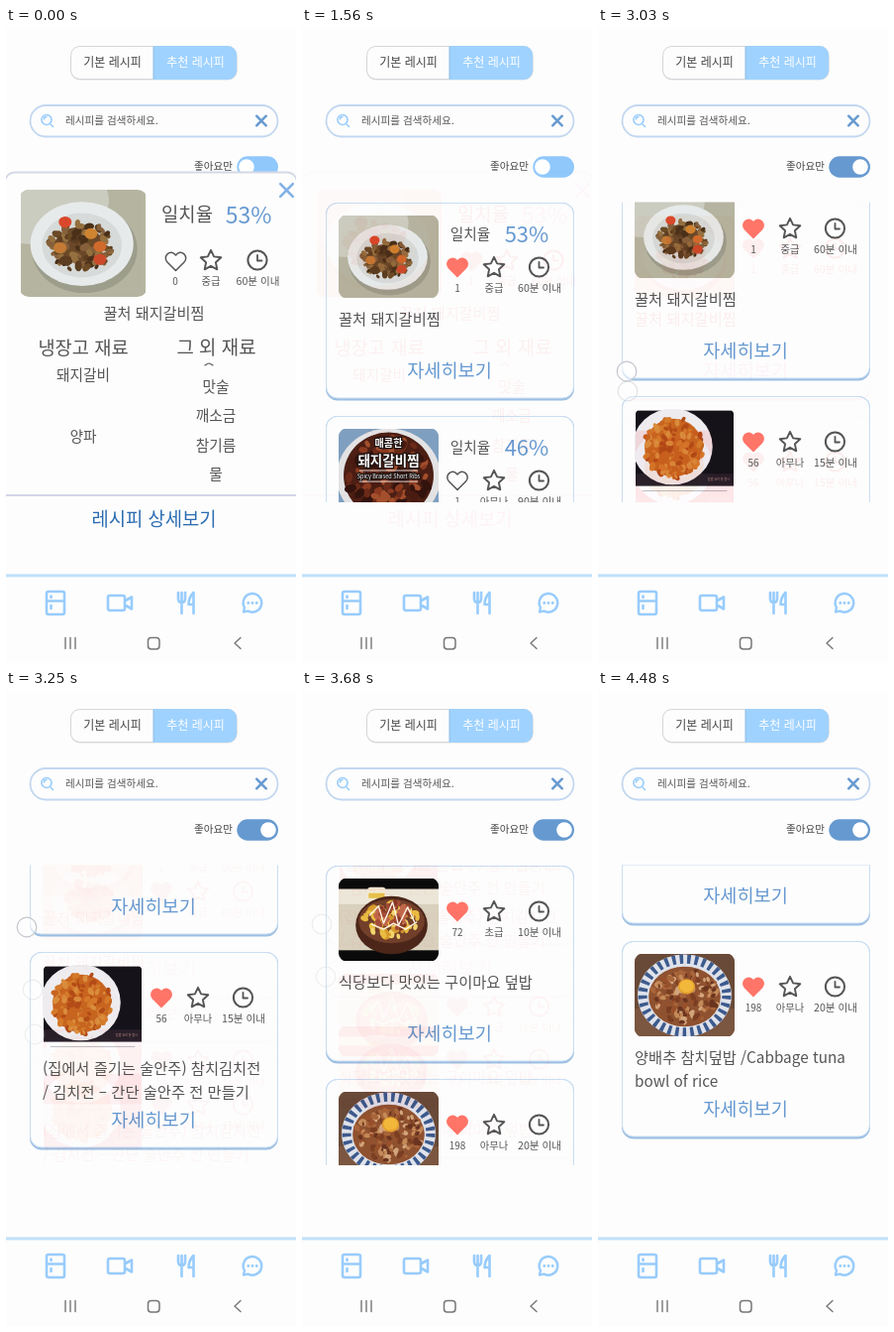
Write an HTML page that moves like this. It is 293 by 640 pixels and loops after 4550 ms.

```html
<!DOCTYPE html>
<html lang="ko">
<head>
<meta charset="utf-8">
<title>추천 레시피</title>
<style>
  html, body { margin: 0; width: 100%; height: 100%; overflow: hidden; background: #fdfdfd; }
  svg#stage { display: block; width: 100vw; height: 100vh; }
  text { font-family: "Noto Sans CJK KR", "Noto Sans CJK", "Noto Sans", sans-serif; }
  .trail { mix-blend-mode: multiply; filter: url(#pink); }
</style>
</head>
<body>
<svg id="stage" viewBox="0 0 293 640" preserveAspectRatio="none"></svg>
<script>
const LOOP = 4550;
const INK = '#555', SOFT = '#98ccfc', BLUE = '#6699d0', PAPER = '#fdfdfd', RED = '#ff7568';

// ---------- drawing helpers ----------
const text = (x, y, str, size, fill = INK, anchor = 'middle', weight = 400) =>
  `<text x="${x}" y="${y + size * .41}" font-size="${size}" fill="${fill}" text-anchor="${anchor}" font-weight="${weight}">${str}</text>`;
const rect = (x, y, w, h, r, fill, extra = '') =>
  `<rect x="${x}" y="${y}" width="${w}" height="${h}" rx="${r}" fill="${fill}" ${extra}/>`;
const ellipse = (x, y, rx, ry, fill, extra = '') =>
  `<ellipse cx="${x}" cy="${y}" rx="${rx}" ry="${ry}" fill="${fill}" ${extra}/>`;
const line = (d, color, width) =>
  `<path d="${d}" fill="none" stroke="${color}" stroke-width="${width}" stroke-linecap="round" stroke-linejoin="round"/>`;
const cross = (x, y, r, color, w) => line(`M${x - r} ${y - r}l${2 * r} ${2 * r}m0 ${-2 * r}l${-2 * r} ${2 * r}`, color, w);

const heart = (x, y, liked, id = '') =>
  `<path ${id} transform="translate(${x} ${y})" d="M0 9.5L-8.5 1C-14-5-5-13 0-6C5-13 14-5 8.5 1Z"
    fill="${liked ? RED : 'none'}" stroke="${liked ? RED : INK}" stroke-width="1.5" stroke-linejoin="round"/>`;
const star = (x, y) => {
  const points = Array.from({ length: 10 }, (_, i) => {
    const a = i * Math.PI / 5 - Math.PI / 2, r = i % 2 ? 5.2 : 10.8;
    return `${(x + r * Math.cos(a)).toFixed(1)},${(y + .6 + r * Math.sin(a)).toFixed(1)}`;
  });
  return `<polygon points="${points.join(' ')}" fill="none" stroke="${INK}" stroke-width="1.9" stroke-linejoin="round"/>`;
};
const clock = (x, y) => ellipse(x, y, 9.6, 9.6, 'none', `stroke="${INK}" stroke-width="2"`) +
  line(`M${x} ${y - 5}v5.5h4.5`, INK, 1.8);

// ---------- food pictures, 100 x 83 ----------
function blobs(seed, count, cx, cy, rx, ry, colors, size) {
  const rnd = () => (seed = (seed * 16807) % 2147483647) / 2147483647;
  rnd();
  let out = '';
  for (let i = 0; i < count; i++) {
    const a = rnd() * 6.28, d = Math.sqrt(rnd()), s = size * (.6 + rnd() * .7);
    const x = (cx + rx * d * Math.cos(a)).toFixed(1), y = (cy + ry * d * Math.sin(a)).toFixed(1);
    out += ellipse(x, y, s.toFixed(1), (s * .65).toFixed(1), colors[i % colors.length],
      `transform="rotate(${Math.round(rnd() * 180)} ${x} ${y})"`);
  }
  return out;
}

const photos = {
  ribs: rect(0, 0, 100, 83, 0, '#b5b4a0') + ellipse(10, 8, 60, 34, '#cbccc0') +
    ellipse(51, 46, 41, 34, '#9d9d8c') + ellipse(49, 42, 40, 32.5, '#e6eaea') + ellipse(49, 43, 31, 25, '#d6dad8') +
    ellipse(47, 43, 19, 14, '#6a4829') +
    blobs(97, 95, 48, 44, 24, 19, ['#6b4a25', '#85603a', '#4b3019', '#95703f', '#5c3d20'], 3.4) +
    [[36, 25, '#d9482a'], [56, 34, '#cf8430'], [63, 44, '#d06a2c'], [32, 45, '#c47a34'], [63, 54, '#cc4a2a']]
      .map(([x, y, c]) => ellipse(x, y, 5, 4.3, c)).join(''),
  stew: rect(0, 0, 100, 83, 0, '#7f9fc0') + ellipse(50, 48, 52, 48, '#e3e3e4') + ellipse(50, 47, 45, 43, '#4c1f14') +
    blobs(211, 110, 50, 47, 41, 39, ['#6b2a18', '#8b3a20', '#33130d', '#a34f2c', '#4a1b11'], 5) +
    `<g stroke="#201513" stroke-width="2.5" paint-order="stroke">` +
    text(50, 14.5, '매콤한', 10, '#fff', 'middle', 700) + text(50, 32, '돼지갈비찜', 13.4, '#fff', 'middle', 700) +
    text(50, 48, 'Spicy Braised Short Ribs', 5.5, '#fff') + '</g>' + line('M21 42h58M21 53h58', '#fff', .8),
  jeon: rect(0, 0, 100, 83, 0, '#fff') + rect(1, 2, 98, 75, 0, '#15121a') + rect(1, 65, 98, 12, 0, '#29202a') +
    ellipse(38, 38, 40, 38, '#eeecef') + ellipse(39, 39, 29, 29, '#c8641f') +
    blobs(131, 120, 39, 39, 30, 30, ['#c6651f', '#d47a2a', '#b24b17', '#d98d3c'], 3.6) +
    text(84, 70, '집밥 요리 한 접시', 3, '#c99') + line('M8 82.5h84', '#778', .8),
  mayo: rect(0, 0, 100, 83, 0, '#0c0b0b') + rect(0, 11, 100, 61, 0, '#d9d0bd') + rect(0, 11, 100, 15, 0, '#ece6d8') +
    rect(29, 9, 18, 17, 3, '#f2ead4') + rect(30, 15, 16, 5, 0, '#e7c14b') +
    ellipse(53, 47, 36, 29, '#4b2619') + ellipse(53, 43, 33, 22, '#72402a') +
    blobs(53, 70, 53, 42, 28, 17, ['#e9bd42', '#f2d56d', '#d79c2c'], 4) +
    blobs(311, 40, 54, 38, 18, 13, ['#a34b35', '#c1674a', '#853625'], 4) +
    line('M31 37l9-9 5 17 9-21 6 23 9-18 7 15M33 46l12 5 10-6 12 6 11-7', '#fff6e6', 1.4),
  tuna: rect(0, 0, 100, 83, 0, '#694a38') + rect(0, 55, 100, 28, 0, '#7b5640') +
    ellipse(50, 42, 47, 41, '#dfe2ea') +
    ellipse(50, 42, 42, 36.5, 'none', 'stroke="#3c5a8d" stroke-width="9" stroke-dasharray="3.5 4"') +
    ellipse(50, 43, 36, 30, '#8f5230') +
    blobs(173, 150, 50, 43, 33, 27, ['#a8653a', '#c48a58', '#7c3f22', '#d3a57c', '#98502c', '#6a3420'], 3.2) +
    ellipse(52, 33, 8.5, 7.5, '#e5a02e') + ellipse(52, 32.5, 7, 6, '#f2b83c'),
};
const photo = (name, x, y, w, h) => `<use href="#${name}" x="${x}" y="${y}" width="${w}" height="${h}"/>`;

// ---------- recipe cards ----------
function card(index, { pic, likes, level, time, title, match, liked = true }) {
  const y = 176 + 215 * index, sy = y + (match ? 65 : 46);
  return rect(24, y, 251, 199.5, 12, '#9dbfe2') + rect(24.5, y + .5, 250, 196.5, 11.5, PAPER, 'stroke="#c9def4"') +
    photo(pic, 37, y + 13, 101, 83) +
    (match ? text(170, y + 30.5, '일치율', 14.7) + text(227, y + 30.5, match, 22, BLUE) : '') +
    heart(157, sy, liked) + star(194, sy) + clock(239.5, sy) +
    text(157, sy + 21, likes, 10) + text(194, sy + 21, level, 10.3) + text(240, sy + 21, time, 10.6) +
    title.map((row, i) => text(37, y + 116.5 + i * 24, row, 15.3, INK, 'start')).join('') +
    text(149, y + 168, '자세히보기', 18.6, BLUE, 'middle', 500);
}
const ribs = { pic: 'ribs', likes: 1, level: '중급', time: '60분 이내', title: ['꿀처 돼지갈비찜'] };
const allCards = [
  { ...ribs, match: '53%' },
  { pic: 'stew', likes: 1, level: '아무나', time: '90분 이내', title: ['매콤한 돼지갈비찜'], match: '46%', liked: false },
];
const likedCards = [
  ribs,
  { pic: 'jeon', likes: 56, level: '아무나', time: '15분 이내', title: ['(집에서 즐기는 술안주) 참치김치전', '/ 김치전 – 간단 술안주 전 만들기'] },
  { pic: 'mayo', likes: 72, level: '초급', time: '10분 이내', title: ['식당보다 맛있는 구이마요 덮밥'] },
  { pic: 'tuna', likes: 198, level: '아무나', time: '20분 이내', title: ['양배추 참치덮밥 /Cabbage tuna', 'bowl of rice'] },
];
const cards = list => list.map((c, i) => card(i, c)).join('');

// ---------- fixed parts ----------
const header =
  rect(65.5, 19.5, 168, 33, 9, '#ddd') + rect(65.5, 18.5, 167.5, 33, 9, PAPER, 'stroke="#d3d6da"') +
  `<path d="M149 18h75a9 9 0 0 1 9 9v16a9 9 0 0 1-9 9h-75z" fill="#9fd2ff"/>` + line('M149 19v32', '#8fbce5', 1) +
  text(107.5, 34.5, '기본 레시피', 12, '#444') + text(191.5, 34.5, '추천 레시피', 12, '#fff') +
  rect(24.5, 78, 250, 31.5, 15.7, PAPER, 'stroke="#c3d7f1" stroke-width="1.8"') +
  ellipse(41, 92.5, 5, 5, 'none', `stroke="${SOFT}" stroke-width="1.6"`) + line('M45 97l2.5 2.5M38.5 92a2.6 2.6 0 0 1 2.5-2.5', SOFT, 1.5) +
  text(60, 93, '레시피를 검색하세요.', 10.6, INK, 'start') + cross(258, 93.5, 4.8, BLUE, 2.4) +
  text(209.5, 138.5, '좋아요만', 10.6, '#444') +
  rect(233.3, 129.3, 41.7, 21.4, 10.7, SOFT, 'id="track"') + ellipse(243, 140, 7.8, 7.8, '#fff', 'id="knob"');

const footer =
  rect(0, 550, 293, 90, 0, PAPER) + rect(0, 550.4, 293, 3, 0, '#c0e0fb') +
  line('M43 568h14q2 0 2 2v19q0 2-2 2h-14q-2 0-2-2v-19q0-2 2-2zM41 577.5h18M45.5 572.5v1.5M45.5 582v3', SOFT, 2.6) +
  line('M105 572h13q2 0 2 2v11q0 2-2 2h-13q-2 0-2-2v-11q0-2 2-2zM120 577.5l7-4v12l-7-4', SOFT, 2.6) +
  line('M174 569v6q0 4 3.5 4t3.5-4v-6M177.5 569v21M189.5 590v-21q-5 5-5 12h5', SOFT, 2.6) +
  line('M240 588.5l1-4.3a9.3 9.3 0 1 1 3.6 3.4z', SOFT, 2.4) +
  [244.8, 249, 253.2].map(x => ellipse(x, 579.5, 1.4, 1.4, SOFT)).join('') +
  line('M60 614.5v11M65 614.5v11M70 614.5v11', '#777', 1.4) +
  rect(143.5, 614.5, 11.5, 11.5, 3.2, 'none', 'stroke="#777" stroke-width="1.5"') +
  line('M237 614.5l-6 5.5 6 5.5', '#777', 1.4);

const popup =
  rect(-1, 145.5, 295, 430, 10, PAPER, 'stroke="#d5d9e6" stroke-width="1.8"') + line('M0 471h293', '#d3d5e6', 1.8) +
  cross(283.5, 163.5, 6.3, '#82b1e6', 2.6) + photo('ribs', 15, 163, 126, 108) +
  text(183, 187.5, '일치율', 18.8) + text(245, 187.5, '53%', 23, BLUE) +
  heart(171.5, 235, false, 'id="like"') + star(207, 234) + clock(254, 234) +
  `<g id="count">${text(171, 255, '0', 10)}</g>` + text(207, 255, '중급', 10.3) + text(254.5, 254.5, '60분 이내', 10.6) +
  text(149.5, 287, '꿀처 돼지갈비찜', 15.2) +
  text(78, 321, '냉장고 재료', 18.7) + text(212.5, 321, '그 외 재료', 18.9) +
  line('M201 340q3-2 4-2t4 2', INK, 1.2) +
  text(78, 348.5, '돼지갈비', 14.7) + text(78, 411, '양파', 14.7) +
  ['맛술', '깨소금', '참기름', '물'].map((s, i) => text(212, 361 + i * 29.3, s, 14.7)).join('') +
  text(149.5, 494.5, '레시피 상세보기', 18.8, '#2a6cb2', 'middle', 500);

const finger = (id, opacity) =>
  ellipse(0, 0, 9.8, 9.8, '#fff', `id="${id}" fill-opacity=".6" stroke="#c3c6cc" stroke-width="1.2" opacity="${opacity}"`);

const stage = document.getElementById('stage');
stage.innerHTML =
  `<defs><clipPath id="round">${rect(0, 0, 100, 83, 8, '#000')}</clipPath>
   <clipPath id="view">${rect(23, 175.5, 253, 302.5, 0, '#000')}</clipPath>
   <filter id="pink" color-interpolation-filters="sRGB">
     <feColorMatrix values="0 0 0 0 1  0 1 0 0 0  0 0 1 0 0  0 0 0 1 0"/></filter>` +
  Object.entries(photos).map(([id, art]) =>
    `<symbol id="${id}" viewBox="0 0 100 83" preserveAspectRatio="xMidYMid slice"><g clip-path="url(#round)">${art}</g></symbol>`).join('') +
  `</defs>` + rect(0, 0, 293, 640, 0, PAPER) + header +
  `<g clip-path="url(#view)"><g id="all">${cards(allCards)}</g><g id="liked">${cards(likedCards)}</g>
   <use id="trail1" class="trail" href="#liked"/><use id="trail2" class="trail" href="#liked"/></g>
   <g id="popup">${popup}</g>` + footer +
  finger('touch2', .25) + finger('touch1', .3) + finger('touch0', 1);

// ---------- motion ----------
const run = (from, to, steps) => Array.from({ length: steps }, (_, i) => Math.round((from + (to - from) * i / (steps - 1)) / 10) * 10);
const times = [0, ...run(70, 560, 8), ...run(650, 920, 4), ...run(1100, 1560, 7), ...run(1630, 2080, 7),
  2160, 2240, 2310, 2390, 2480, 2590, ...run(2700, 3140, 5), 3250, 3360, 3440, 3520, 3600, 3680, 3760,
  3840, 3920, 4000, ...run(4060, 4360, 6), 4420, 4480];

const scrollKeys = [[2920, 0], [3030, 20], [3140, 65], [3250, 128], [3360, 158], [3440, 213], [3520, 281],
  [3600, 334], [3680, 430], [3760, 480], [3840, 492], [3920, 548], [4000, 569]];
const knobKeys = [[2390, 0], [2480, .73], [2590, 1]];
const touches = [
  [[140, 171, 236], [420, 171, 236]],
  [[740, 281, 161], [1100, 281, 161]],
  [[1930, 254, 140], [2240, 254, 140]],
  [[2810, 30, 366], [2920, 30, 366], [3030, 29, 346], [3140, 27, 301], [3250, 21, 238], [3360, 13, 208]],
  [[3520, 24, 288], [3600, 20, 235]],
  [[3840, 24, 290], [3920, 18, 234], [4000, 15, 213], [4060, 15, 213]],
];

function at(keys, t, col = 1) {
  const i = keys.findIndex(k => k[0] > t);
  if (i === 0) return keys[0][col];
  if (i < 0) return keys[keys.length - 1][col];
  const a = keys[i - 1], b = keys[i];
  return a[col] + (b[col] - a[col]) * (t - a[0]) / (b[0] - a[0]);
}

const $ = id => document.getElementById(id);
const set = (id, attrs) => { for (const k in attrs) $(id).setAttribute(k, attrs[k]); };
const show = (id, on) => { $(id).style.display = on ? '' : 'none'; };

function draw(step) {
  const t = times[step], scroll = at(scrollKeys, t), on = at(knobKeys, t);
  const earlier = n => times[Math.max(0, step - n)];

  const open = t < 1180;
  show('popup', t < 1630);
  set('popup', { class: open ? '' : 'trail', opacity: open ? 1 : .08 });
  const liked = t >= 350;
  set('like', { fill: liked ? RED : 'none', stroke: liked ? RED : INK });
  $('count').firstChild.textContent = liked ? 1 : 0;

  const mix = (a, b) => Math.round(a + (b - a) * on);
  set('track', { fill: `rgb(${mix(144, 102)},${mix(200, 153)},${mix(252, 208)})` });
  set('knob', { cx: 243 + 22 * on });

  const filtered = t >= 2390;
  show('all', !filtered);
  show('liked', filtered);
  set('liked', { transform: `translate(0 ${-scroll})` });
  [1, 2].forEach(n => {
    const lag = scroll - at(scrollKeys, earlier(n));
    show('trail' + n, lag > 0);
    set('trail' + n, { transform: `translate(0 ${lag})`, opacity: .05 });
  });

  [0, 1, 2].forEach(n => {
    const then = earlier(n);
    const path = touches.find(p => then >= p[0][0] && then <= p[p.length - 1][0]);
    show('touch' + n, path);
    if (path) set('touch' + n, { cx: at(path, then, 1), cy: at(path, then, 2) });
  });
}

const start = performance.now();
let current = -1;
function tick() {
  const t = (performance.now() - start) % LOOP;
  const next = times.findIndex(k => k > t);
  const step = (next < 0 ? times.length : next) - 1;
  if (step !== current) draw(current = step);
  requestAnimationFrame(tick);
}
tick();
</script>
</body>
</html>
```
